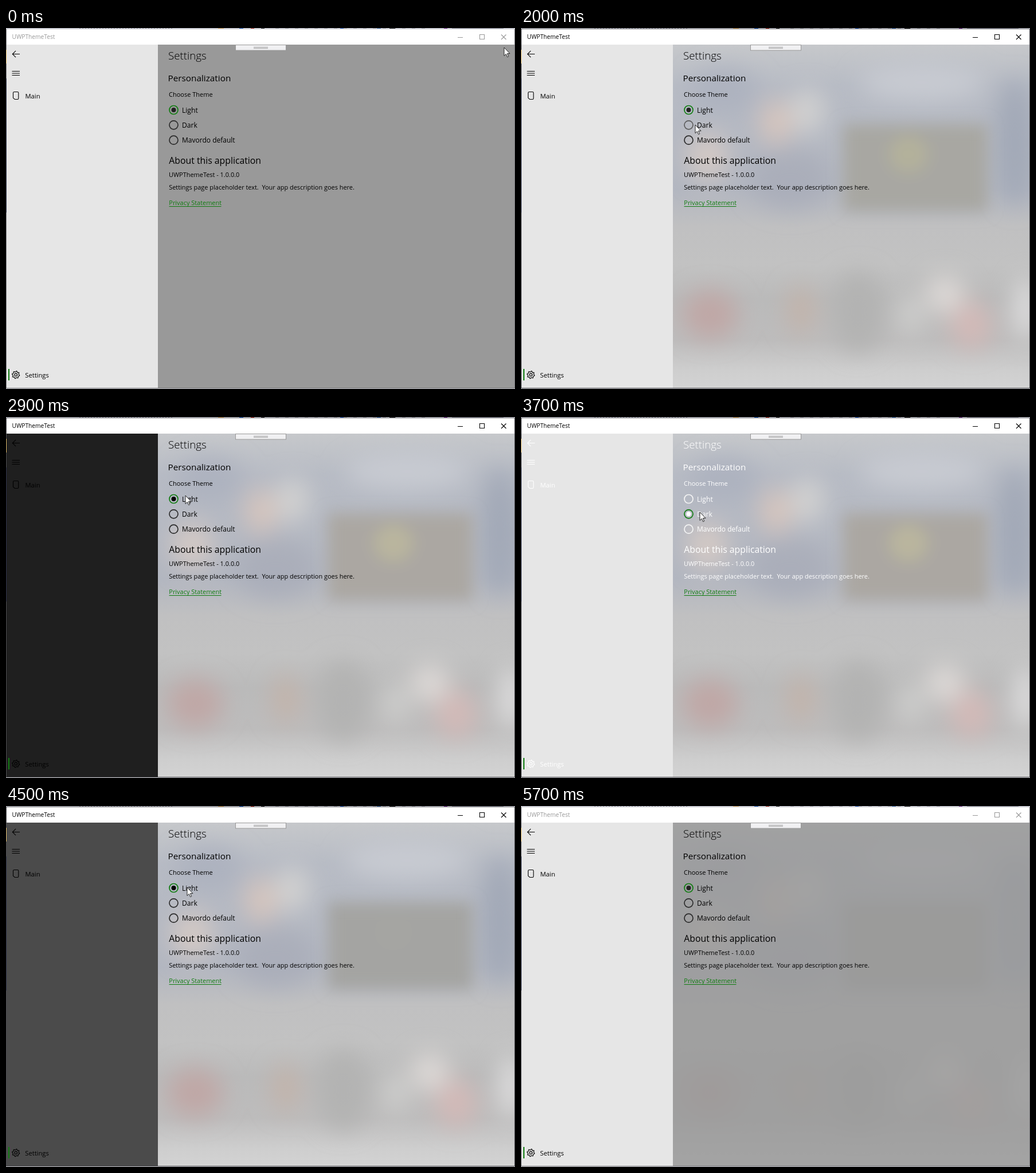
These frames come from a looping animation (888x630 px, 5800 ms). An HTML page:

```html
<!DOCTYPE html>
<html lang="en">
<head>
<meta charset="utf-8">
<title>Theme settings</title>
<style>
  html, body { margin: 0; width: 100%; height: 100%; overflow: hidden; background: #fff; }
  svg { display: block; }
  text { font-family: "Open Sans", "Noto Sans", sans-serif; white-space: pre; fill: currentColor; }
  .line { fill: none; stroke: currentColor; stroke-width: 1.1; }
</style>
</head>
<body>
<svg id="stage" width="888" height="630" viewBox="0 0 888 630">
  <defs>
    <filter id="soft" x="-60%" y="-60%" width="220%" height="220%"><feGaussianBlur stdDeviation="20"/></filter>
    <filter id="edge" x="-40%" y="-40%" width="180%" height="180%"><feGaussianBlur stdDeviation="13"/></filter>
    <linearGradient id="base" x1="0" y1="0" x2="0" y2="1">
      <stop offset="0" stop-color="#c6c8cb"/>
      <stop offset=".12" stop-color="#b7bbc4"/>
      <stop offset=".42" stop-color="#b2b6c0"/>
      <stop offset=".53" stop-color="#c0c0c1"/>
      <stop offset=".64" stop-color="#c2c2c2"/>
      <stop offset=".74" stop-color="#bababa"/>
      <stop offset=".86" stop-color="#bdbcbc"/>
      <stop offset=".95" stop-color="#cecece"/>
      <stop offset="1" stop-color="#d3d3d3"/>
    </linearGradient>
    <clipPath id="page"><rect x="265" y="29" width="622" height="599"/></clipPath>
  </defs>

  <rect width="888" height="630" fill="#cfd0d8"/>
  <g id="scraps"></g>
  <rect id="bar" x="1" y="2" width="886" height="27" fill="#fff"/>
  <rect id="side" x="1" y="29" width="264" height="599"/>
  <rect x="265" y="29" width="622" height="599" fill="#999"/>
  <g id="acrylic" clip-path="url(#page)">
    <rect x="265" y="29" width="622" height="599" fill="url(#base)"/>
    <g id="blobs" filter="url(#soft)"></g>
    <g filter="url(#edge)">
      <rect id="patch" x="562" y="168" width="252" height="152"/>
      <ellipse id="glow" cx="676" cy="220" rx="34" ry="32"/>
    </g>
  </g>

  <rect x="400.5" y="29.5" width="88" height="9.5" fill="#f0f0f2" stroke="#999"/>
  <path d="M432 33.5h25M432 35.5h25" stroke="#a0a0a0"/>

  <g id="frame" fill="none">
    <path id="top" d="M0 1.5H888"/>
    <path d="M.5 2V629M887.5 2V629M0 628.5H888"/>
  </g>
  <path d="M0 629.5H888" stroke="#b9b9bd"/>
  <path d="M.5 38V62" stroke="#d9b566"/>
  <path d="M.5 88V322" stroke="#2b3048"/>

  <g id="caption">
    <text x="10.5" y="19" font-size="10.2">UWPThemeTest</text>
    <path class="line" d="M788 16.5h9M826.5 11.5h8v8h-8zM864 11.5l8.5 8.5M872.5 11.5l-8.5 8.5"/>
  </g>

  <g id="ui">
    <path class="line" d="M24 45.5H11.5M17 39.8l-5.7 5.7 5.7 5.7M10.5 75.5h13.5M10.5 79h13.5M10.5 82.5h13.5"/>
    <path class="line" d="M14.5 111.5h5.5q1.8 0 1.8 1.8v9.4q0 1.8-1.8 1.8h-4.6l-2.9-2.4v-8.8q0-1.8 2-1.8z"/>
    <path id="gear" class="line"/>
    <circle class="line" cx="17.2" cy="605.2" r="2.3"/>
    <rect x="4" y="595" width="2" height="20" fill="#107c10"/>
    <g id="words"></g>
    <g id="radios"></g>
  </g>
  <g fill="#107c10" color="#107c10">
    <text x="284.3" y="309" font-size="10.95">Privacy Statement</text>
    <rect x="284.5" y="311" width="91" height="1"/>
  </g>
  <path id="cursor" d="M0 0V14.5L3.3 11.4 5.6 16.6 7.7 15.7 5.5 10.6H10Z" fill="#fff" stroke="#111" stroke-width=".9"/>
</svg>

<script>
const LOOP = 5800, STEP = 100, GREEN = "#107c10";
const $ = id => document.getElementById(id);

function add(parent, tag, attrs, text) {
  const el = document.createElementNS("http://www.w3.org/2000/svg", tag);
  for (const key in attrs) el.setAttribute(key, attrs[key]);
  if (text) el.textContent = text;
  return parent.appendChild(el);
}

// text, x, baseline, size, weight
[
  ["Main", 33.5, 123, 11.2],
  ["Settings", 33.3, 610, 11.2],
  ["Settings", 283, 54.7, 18.7, 350],
  ["Personalization", 282.5, 93, 15.3],
  ["Choose Theme", 284, 119.5, 11],
  ["Light", 307, 147.7, 12.1],
  ["Dark", 307, 174, 12.1],
  ["Mavordo default", 307, 200.3, 12],
  ["About this application", 284.3, 237, 15.8],
  ["UWPThemeTest - 1.0.0.0", 284, 260, 10.95],
  ["Settings page placeholder text.\u00a0 Your app description goes here.", 284.2, 282, 10.95]
].forEach(([s, x, y, size, weight = 400]) =>
  add($("words"), "text", { x, y, "font-size": size, "font-weight": weight }, s));

// cx, cy, rx, ry, colour
[
  [700, 95, 110, 32, "#c8cbd2"],
  [862, 200, 34, 110, "#a2a9b7"],
  [355, 110, 60, 40, "#adb2bf"],
  [470, 265, 70, 50, "#aaaeba"],
  [500, 145, 30, 40, "#d0d0d0"],
  [445, 165, 28, 38, "#d6c5bd"],
  [325, 225, 36, 42, "#d3c9c5"],
  [330, 500, 48, 42, "#c0a7a6"],
  [488, 492, 24, 42, "#c2b3aa"],
  [588, 495, 46, 70, "#b3b3b2"],
  [680, 500, 24, 38, "#cccccb"],
  [740, 465, 34, 34, "#dcd8d6"],
  [785, 518, 36, 42, "#d2b9b7"],
  [882, 490, 24, 55, "#dcdbdc"]
].forEach(([cx, cy, rx, ry, fill]) => add($("blobs"), "ellipse", { cx, cy, rx, ry, fill }));

// slivers of whatever lies behind the window
for (let x = 128; x < 290; x += 5) add($("scraps"), "rect", { x, y: 0, width: 2, height: 2, fill: "#8f9099" });
for (let x = 470; x < 740; x += 17) add($("scraps"), "rect", { x, y: 0, width: 6, height: 2, fill: "#a3a4ab" });
[[370, 10, "#d9a558"], [407, 7, "#1f5fc0"], [427, 6, "#b03020"], [445, 6, "#333"],
 [583, 6, "#2b62c4"], [647, 7, "#4070b0"], [669, 10, "#222"], [764, 6, "#7a2f94"], [778, 90, "#8d8e98"]]
  .forEach(([x, width, fill]) => add($("scraps"), "rect", { x, y: 0, width, height: 2, fill }));

let gear = "";
for (let i = 0; i < 32; i++) {
  const a = (i + 0.5) * Math.PI / 16, r = i % 4 < 2 ? 6.5 : 5;
  gear += (i ? "L" : "M") + (17.2 + r * Math.cos(a)).toFixed(2) + " " + (605.2 + r * Math.sin(a)).toFixed(2);
}
$("gear").setAttribute("d", gear + "Z");

const radios = [143, 169.3, 195.7].map(cy => ({
  ring: add($("radios"), "circle", { cx: 292.5, cy, r: 7.5, fill: "none", "stroke-width": 1.7 }),
  dot: add($("radios"), "circle", { cx: 292.5, cy, r: 4 })
}));

// each row: start time, then the values held until the next row
const cursor = [
  [0, 869, 34], [100, 700, 70], [200, 510, 110], [300, 370, 138], [400, 316, 146],
  [600, 345, 126], [700, 400, 92], [800, 430, 79], [1200, 465, 135], [1300, 515, 215],
  [1400, 535, 259], [1600, 440, 232], [1700, 335, 186], [1800, 304, 169],
  [2600, 313, 137], [3600, 312, 166], [4000, 315, 145], [4200, 316, 142],
  [4700, 480, 145], [4800, 680, 122], [4900, 835, 82], [5000, 852, 70], [5100, 876, 54], [5200, 900, 40]
];
const dark = [[0, 0], [2200, 1], [2900, 0], [3700, 1], [4400, 0]];
const active = [[0, 0], [1000, 1], [5700, 0]];
const pressed = [[0, -1], [2000, 1], [2200, -1], [2800, 0], [2900, -1], [3600, 1], [3700, -1]];
const glass = [[0, 0], [1100, .2], [1200, .45], [1300, .7], [1400, .9], [1500, 1], [5700, .18]];
const patch = [
  [0, "#a8a7a2", "#b3b19b"],
  [2200, "#aba7a2", "#b9b59e"],
  [3900, "#a4a4a2", "#a5a5a2"]
];
const side = [[0, 230]];
const fade = (start, levels) => levels.forEach((v, i) => side.push([start + i * STEP, v]));
const toDark = [180, 105, 31], toLight = [75, 125, 180, 230];
fade(2300, toDark);
fade(3000, toLight);
fade(3800, toDark);
fade(4500, toLight);

const at = (rows, t) => rows.reduce((held, row) => row[0] <= t ? row : held).slice(1);

function draw(ms) {
  const t = Math.floor(ms % LOOP / STEP) * STEP;
  const [x, y] = at(cursor, t), [isDark] = at(dark, t), [isActive] = at(active, t);
  const [press] = at(pressed, t), [level] = at(side, t), [rim, mid] = at(patch, t);

  $("cursor").setAttribute("transform", `translate(${x} ${y})`);
  $("side").setAttribute("fill", `rgb(${level},${level},${level})`);
  $("acrylic").setAttribute("opacity", at(glass, t)[0]);
  $("patch").setAttribute("fill", rim);
  $("glow").setAttribute("fill", mid);
  $("ui").setAttribute("color", isDark ? "#fff" : "#000");
  $("caption").setAttribute("color", isActive ? "#000" : "#999");
  $("frame").setAttribute("stroke", isActive ? "#4a4a4e" : "#77777b");
  $("top").setAttribute("stroke", isActive ? "#55555a" : "#b5b6bd");

  const hover = x > 284 && x < 340 && y > 130 && y < 156;
  radios.forEach(({ ring, dot }, i) => {
    const on = i === isDark;
    const idle = isDark ? "#f4f4f4" : "#2b2b2b";
    ring.setAttribute("stroke", i === press ? (isDark ? "#c8c8c8" : "#5c5c5c") : on ? GREEN : idle);
    dot.setAttribute("fill", isDark ? "#fff" : hover ? "#000" : "#222");
    dot.setAttribute("visibility", on ? "visible" : "hidden");
  });
}

const began = performance.now();
function tick() {
  draw(performance.now() - began);
  requestAnimationFrame(tick);
}
tick();
</script>
</body>
</html>
```
